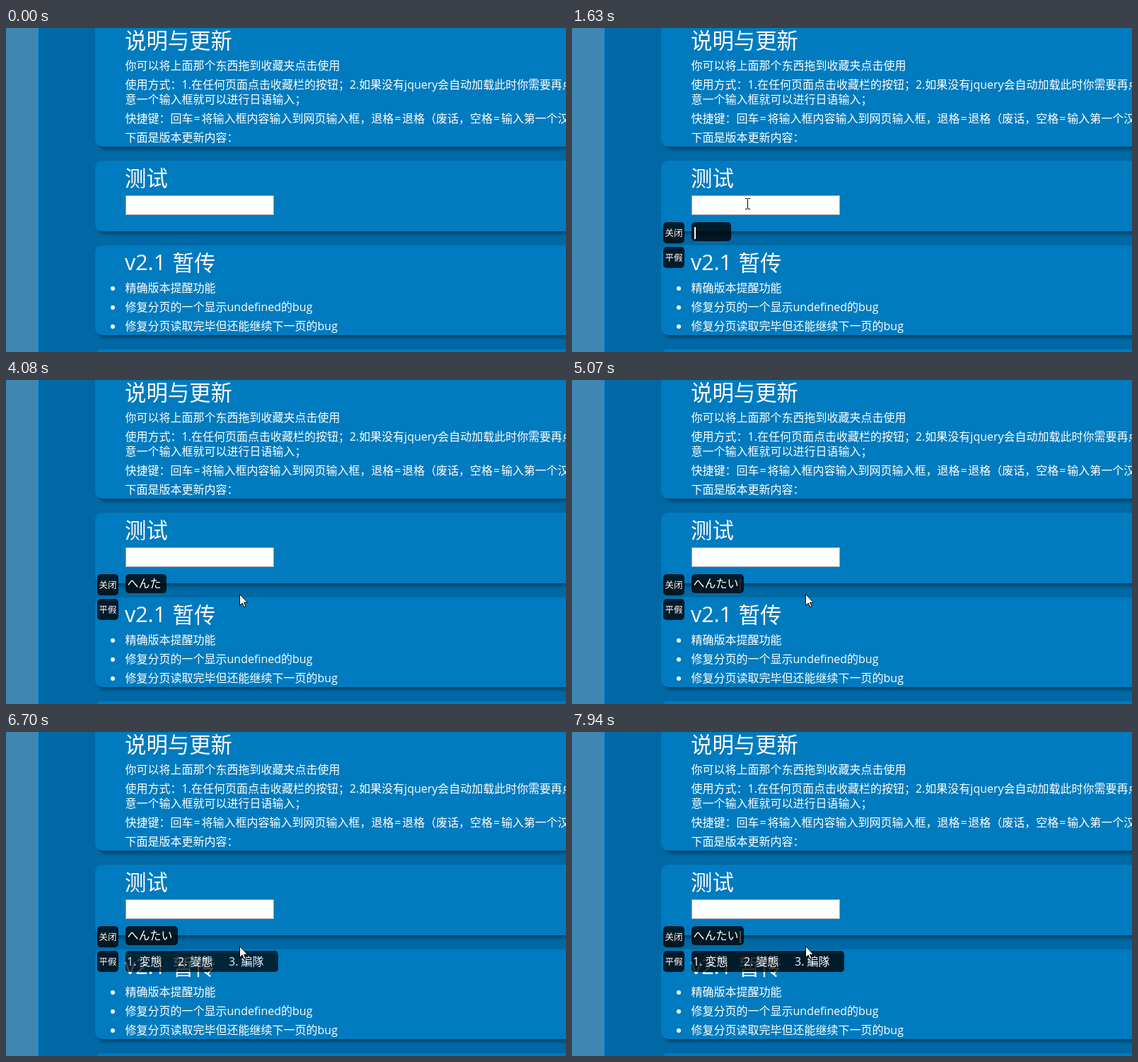
An HTML page that plays this animation: 792 px wide and 459 px high, repeating every 8 s.

```html
<!DOCTYPE html>
<html lang="zh">
<head>
<meta charset="utf-8">
<style>
html, body { margin: 0; width: 100%; height: 100%; overflow: hidden; background: #0069a5; }
svg { display: block; }
text { font: 500 16px "Noto Sans CJK SC", "Noto Sans CJK", sans-serif; fill: #fff; white-space: pre; }
.ja { font-family: "Noto Sans CJK JP", "Noto Sans CJK", sans-serif; }
.head { font-size: 30.4px; }
.small { font-size: 12.5px; }
.latin { font-family: "Open Sans", sans-serif; }
.eq { letter-spacing: 1.7px; }
.card { fill: #007bbf; filter: drop-shadow(4px 4px 2px rgba(0, 0, 0, .36)); }
.dark { fill: rgba(0, 0, 0, .78); }
#kana { font-weight: 400; }
</style>
</head>
<body>
<svg width="792" height="459" viewBox="0 0 792 459">
  <rect width="44" height="459" fill="#3e87b3"/>
  <rect x="44" width="2" height="459" fill="#0a96ee"/>
  <g id="page"></g>
  <rect x="169.5" y="237.5" width="209" height="27" fill="#fff" stroke="#a3a8ac"/>
  <g id="ime">
    <g id="buttons"></g>
    <rect id="bar" class="dark" x="169" y="275" height="27" rx="5"/>
    <text id="kana" class="ja" x="171.5" y="294"></text>
    <rect id="caret" y="282" width="2" height="17" fill="#fff"/>
    <g id="list"></g>
  </g>
  <path id="arrow" d="M.5.5V16.5L4.2 13L6.7 18.6L9 17.6L6.6 12.2H11.5Z" fill="#fff" stroke="#000"/>
  <path id="beam" d="M-3-7.5H0M1-7.5H4M.5-7V7M-3 7.5H0M1 7.5H4" fill="none" stroke="#000"/>
</svg>
<script>
const $ = id => document.getElementById(id);

const latin = s => s.replace(/=|[!-<>-~][ -<>-~]*/g, m =>
  m === '=' ? '<tspan class="latin eq" dx="1">=</tspan>' : `<tspan class="latin">${m}</tspan>`);
const text = (x, y, s, cls = '') => `<text x="${x}" y="${y}" class="${cls}">${latin(s)}</text>`;
const box = (x, y, w, h, r, cls) =>
  `<rect x="${x}" y="${y}" width="${w}" height="${h}" rx="${r}" class="${cls}"/>`;
const card = (y, h) => box(126, y, 700, h, 10, 'card');
const item = (y, s) => `<circle cx="151" cy="${y - 5}" r="3" fill="#fff"/>` + text(168.5, y, s);

$('page').innerHTML = [
  card(-40, 208), card(188, 100), card(308, 127), card(455, 100),
  text(168, 29, '说明与更新', 'head'),
  text(168.5, 59, '你可以将上面那个东西拖到收藏夹点击使用'),
  text(168.5, 86, '使用方式：1.在任何页面点击收藏栏的按钮；2.如果没有jquery会自动加载此时你需要再点'),
  text(168.5, 107, '意一个输入框就可以进行日语输入；'),
  text(168.5, 134, '快捷键：回车=将输入框内容输入到网页输入框，退格=退格（废话，空格=输入第一个汉'),
  text(168.5, 161, '下面是版本更新内容：'),
  text(168, 224, '测试', 'head'),
  text(168, 343, 'v2.1', 'head'),
  text(235.5, 344, '暂传', 'head'),
  item(374, '精确版本提醒功能'),
  item(401, '修复分页的一个显示undefined的bug'),
  item(428, '修复分页读取完毕但还能继续下一页的bug')
].join('');

$('buttons').innerHTML = ['关闭', '平假'].map((s, i) =>
  box(129, 275 + 35 * i, 30, 30, 5, 'dark') + text(131.5, 294.5 + 35 * i, s, 'small')).join('');

$('list').innerHTML = box(169, 310, 216, 30, 5, 'dark') +
  ['1. 変態', '2. 變態', '3. 編隊'].map((s, i) => text(171 + 72 * i, 330.5, s, 'ja')).join('');

const LOOP = 8000, OPEN = 1630, BLINK = 943;
const keys = [2900, 3330, 3760, 4190];
const swing = (t, start, dur) =>
  .5 - Math.cos(Math.PI * Math.min(1, Math.max(0, (t - start) / dur))) / 2;
const mix = (a, b, p) => a + (b - a) * p;

function caretAlpha(t) {
  const p = (t - 1717 + BLINK) % BLINK;
  if (t < 1717) return 1;
  return p < 465 ? 1 - swing(p, 0, 295) : swing(p, 465, 295);
}

function mouse(t) {
  const a = swing(t, 650, 730), b = swing(t, 1720, 600);
  const x = mix(mix(623, 248, a), 330, b), y = mix(mix(456, 249, a), 303, b);
  const overInput = x > 169 && x < 379 && y > 237 && y < 265;
  for (const id of ['arrow', 'beam']) {
    const on = t >= 490 && overInput === (id === 'beam');
    $(id).setAttribute('visibility', on ? 'visible' : 'hidden');
    $(id).setAttribute('transform', `translate(${Math.round(x)} ${Math.round(y)})`);
  }
}

function draw(t) {
  const n = keys.filter(k => t >= k).length;
  $('ime').setAttribute('visibility', t >= OPEN ? 'visible' : 'hidden');
  $('bar').setAttribute('width', Math.max(56, 10 + 16 * n));
  $('kana').textContent = 'へんたい'.slice(0, n);
  $('caret').setAttribute('x', 173 + 16 * n);
  $('caret').setAttribute('opacity', caretAlpha(t));
  $('list').setAttribute('opacity', swing(t, 6430, 340));
  mouse(t);
}

const begin = performance.now();
function tick() {
  draw((performance.now() - begin) % LOOP);
  requestAnimationFrame(tick);
}
tick();
</script>
</body>
</html>
```
